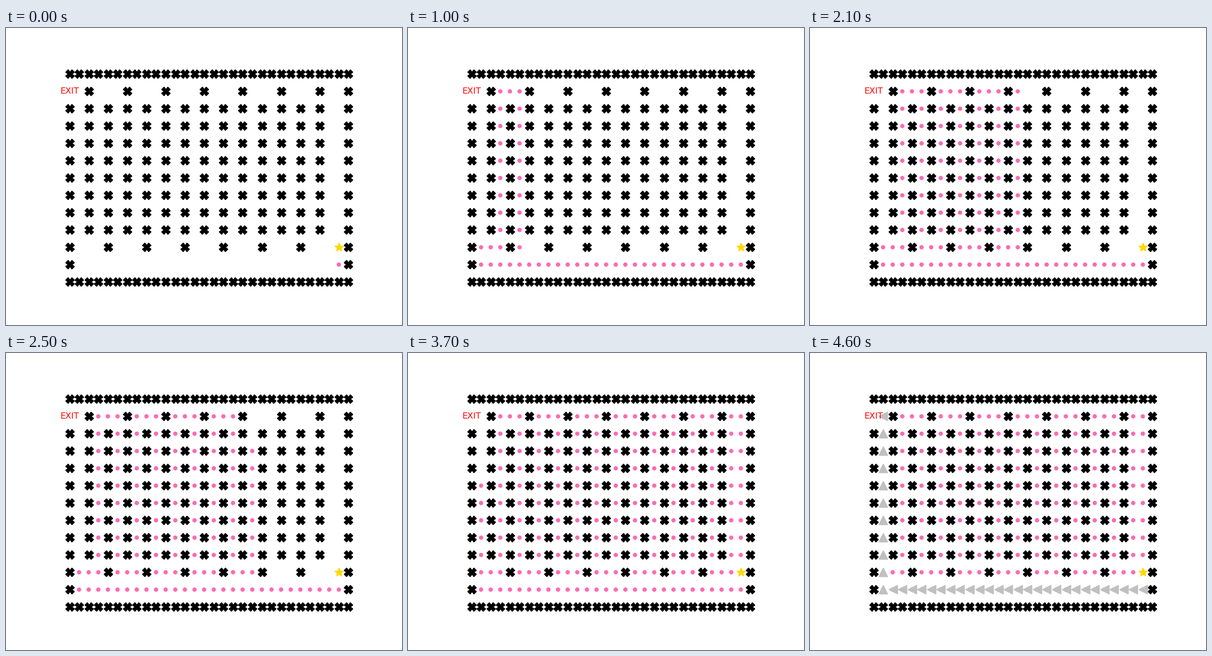
Recreate the animation shown at these times as a matplotlib script. Size 640 by 480 pixels, loop 4.7 s.

```python
import matplotlib.pyplot as plt
from matplotlib.animation import FuncAnimation

COLS, ROWS = 30, 13
STEP = 5          # moves shown per frame
FRAMES = 47

# Maze walls: a frame around a comb of alternating pillars.
walls = [(c, r) for r in (0, ROWS - 1) for c in range(COLS)]
walls += [(0, r) for r in range(2, 12)]
walls += [(COLS - 1, r) for r in range(1, 12)]
for c in range(2, 27, 2):
    rows = range(1, 10) if c % 4 == 2 else range(2, 11)
    walls += [(c, r) for r in rows]

# Search order: along the floor, snake through the comb, then up to the exit.
visited = [(c, 11) for c in range(28, 0, -1)] + [(1, 10), (2, 10)]
for c in range(3, 28, 2):
    rows = range(10, 0, -1) if c % 4 == 3 else range(1, 11)
    visited += [(c, r) for r in rows]
    visited.append((c + 1, rows[-1]))
visited += [(28, r) for r in range(2, 10)]
visited += [(1, r) for r in range(9, 0, -1)]

# Shortest way out.
route = [(c, 11, "<") for c in range(28, 1, -1)]
route += [(1, r, "^") for r in range(11, 1, -1)]
route.append((1, 1, "<"))

fig, ax = plt.subplots(figsize=(6.4, 4.8), dpi=100)
ax.set(xlim=(-1.45, 30.45), ylim=(12.6, -0.6))
ax.set_autoscale_on(False)
ax.axis("off")


def marks(points, marker, color, z):
    xs, ys = zip(*points) if points else ((), ())
    return ax.plot(xs, ys, marker, color=color, ms=10, mew=1, ls="none", zorder=z)[0]


marks(walls, "X", "black", 2)
marks([(28, 10)], "*", "gold", 2.2)
ax.text(0, 1, "EXIT", color="red", size=10, family="DejaVu Sans",
        ha="center", va="center", zorder=3)
dots = ax.scatter(*zip(*visited), s=16, c=["hotpink"] * len(visited),
                  linewidths=1, zorder=2.1)
arrows = {m: marks([], m, "silver", 2.3) for m in "<^"}


def update(frame):
    moves = STEP * frame + 1
    dots.set_offsets(visited[:moves])
    shown = route[:max(0, moves - len(visited))]
    for m, line in arrows.items():
        pts = [(c, r) for c, r, way in shown if way == m]
        line.set_data([c for c, _ in pts], [r for _, r in pts])
    return [dots, *arrows.values()]


anim = FuncAnimation(fig, update, frames=FRAMES, interval=100,
                     repeat=True, repeat_delay=0)
plt.show()
```
